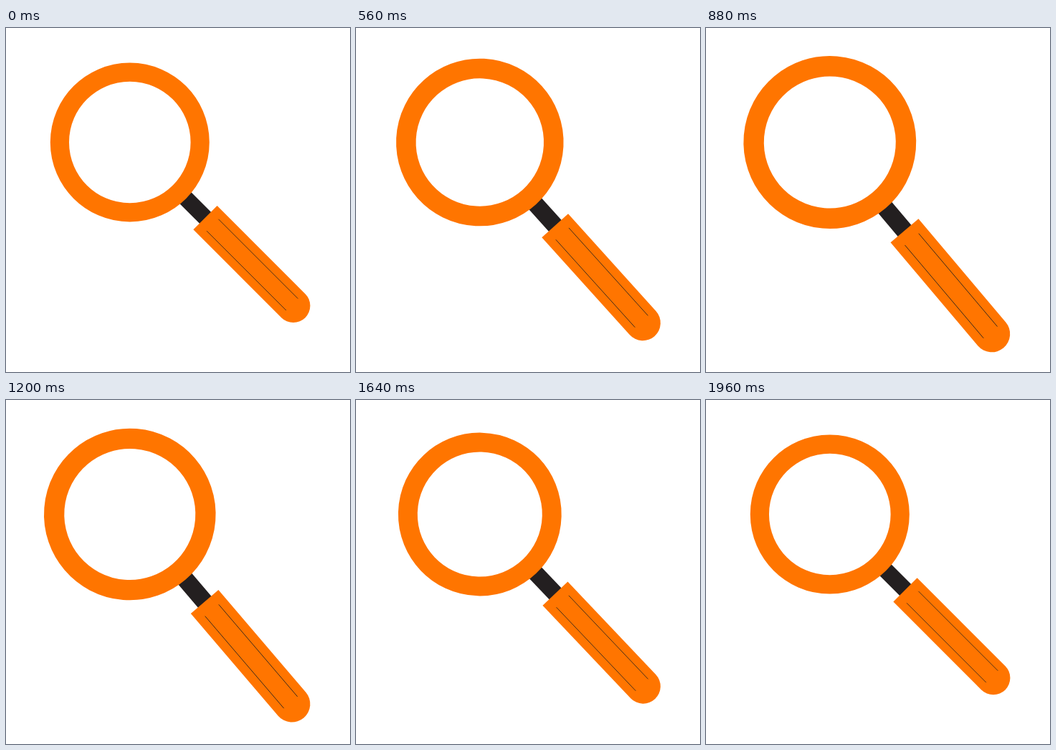
An HTML page that plays this animation: 480 by 480 pixels, repeating every 2000 ms.

```html
<!DOCTYPE html>
<html lang="en">
<head>
<meta charset="utf-8">
<title>Magnifying glass</title>
<style>
  html, body { margin: 0; width: 100%; height: 100%; overflow: hidden; background: #fff; }
  svg { display: block; width: 100%; height: 100%; }
</style>
</head>
<body>
<svg viewBox="0 0 480 480">
  <!-- Drawn along the x axis, with the lens centre at the origin -->
  <g id="glass">
    <rect x="100" y="-11.3" width="52" height="22.6" fill="#231f20"/>
    <circle r="97.9" fill="none" stroke="#ff7500" stroke-width="26.2"/>
    <path d="M148.8-23.5H322.6a23.5 23.5 0 0 1 0 47H148.8z" fill="#ff7500"/>
    <path d="M163.3-11.6H320M163.3 11.6H320" stroke="#231f20" stroke-width=".75"/>
  </g>
</svg>
<script>
  const LOOP = 2000, STEP = 40;
  const glass = document.getElementById('glass');
  const ease = u => u * u * (3 - 2 * u);

  function draw(time) {
    const t = Math.floor((time % LOOP) / STEP) * STEP;
    const swing = ease(1 - Math.abs(t / (LOOP / 2) - 1));
    const angle = 45 + 5 * swing;
    const scale = 1 + 0.0885 * swing;
    glass.setAttribute('transform', `translate(172.8 159.5) rotate(${angle}) scale(${scale})`);
  }

  const start = performance.now();
  function tick() {
    draw(performance.now() - start);
    requestAnimationFrame(tick);
  }
  tick();
</script>
</body>
</html>
```
